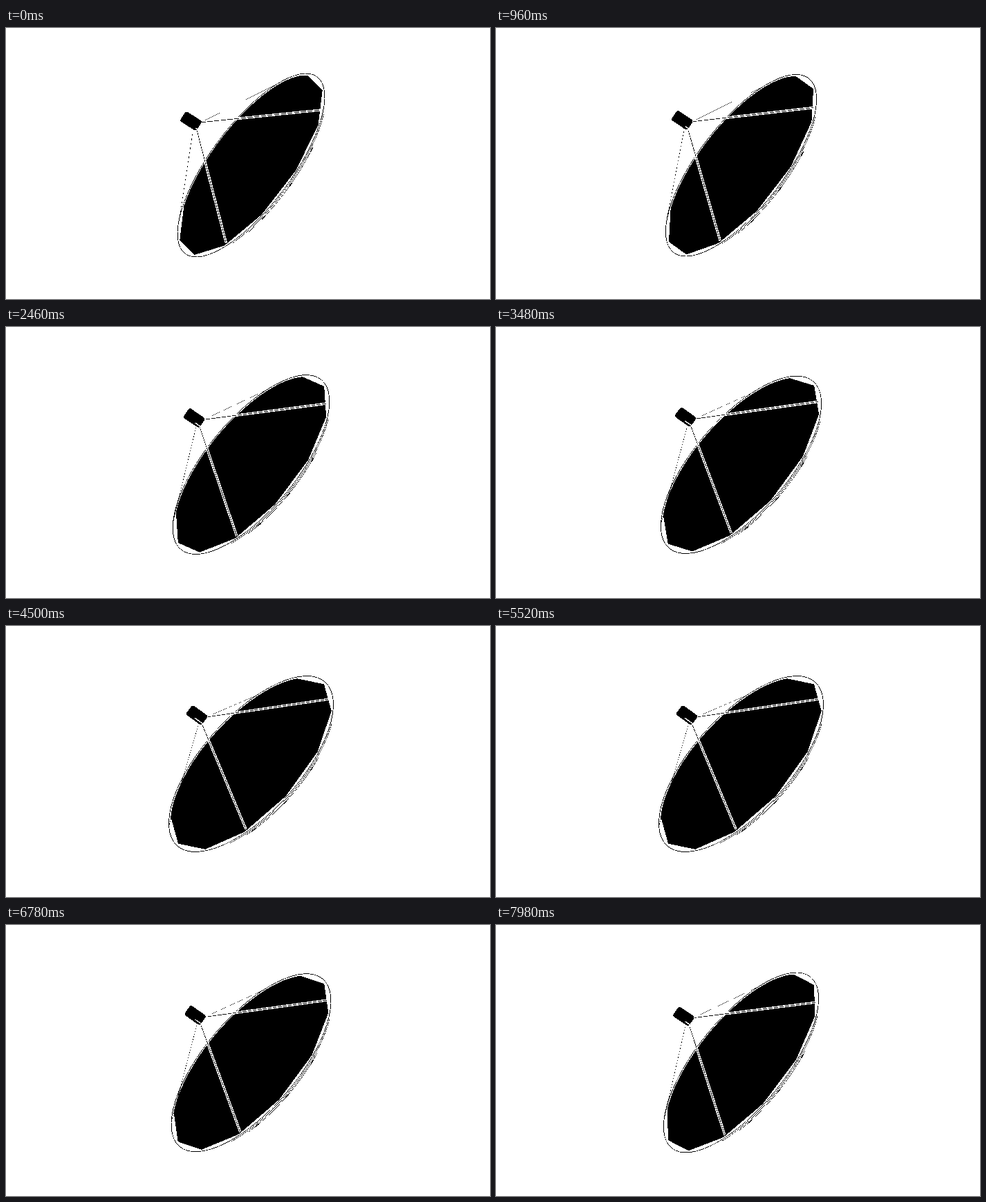
Recreate the animation shown at these times as an HTML page with a canvas. Size 700 by 393 pixels, loop 8000 ms.

```html
<!DOCTYPE html>
<html lang="en">
<head>
<meta charset="utf-8">
<title>Dish antenna</title>
<style>
  html, body { margin: 0; width: 100%; height: 100%; overflow: hidden; background: #fff; }
  canvas { display: block; }
</style>
</head>
<body>
<canvas id="stage" width="700" height="393"></canvas>
<script>
const W = 700, H = 393, LOOP = 8000, STEP = 60, TURN = 5.01, SWING = 4.5;
const DEG = Math.PI / 180, FACET = 30 * DEG, INNER = 0.98;
const ctx = document.getElementById('stage').getContext('2d', { willReadFrequently: true });

// Angle on the rim, reach from the dish centre, and foot on the feed.
const BACK_STRUTS = [
  { angle: 317, reach: 1, foot: [14, -8] },
  { angle: 221, reach: 1, foot: [10, 10] }
];
const FRONT_STRUTS = [
  { angle: 36, reach: 0.965, foot: [14, -7] },
  { angle: 137, reach: 0.96, foot: [15, 7] }
];

const mix = (a, b, k) => a + (b - a) * k;

// Rim ellipse from its half width, half height and the sideways offset of its top.
function rimAt(k) {
  const hx = mix(106.5, 119, k), hy = mix(133, 127.5, k), lean = mix(79.5, 80.5, k);
  const xx = hx * hx, yy = hy * hy, xy = -lean * hy;
  const mean = (xx + yy) / 2, spread = Math.hypot((xx - yy) / 2, xy);
  return {
    x: 354.5, y: mix(199, 200, k),
    a: Math.sqrt(mean + spread), b: Math.sqrt(mean - spread),
    tilt: Math.atan2(2 * xy, xx - yy) / 2,
    spin: -17.5 * DEG * k
  };
}

const feedAt = k => ({ x: mix(267.5, 276, k), y: mix(135, 129.3, k), tilt: mix(33, 36, k) * DEG });

function place({ x, y, tilt }, px, py) {
  const c = Math.cos(tilt), s = Math.sin(tilt);
  return [x + px * c - py * s, y + px * s + py * c];
}

const rimPoint = (rim, angle, reach) =>
  place(rim, rim.a * reach * Math.cos(angle), rim.b * reach * Math.sin(angle));

function arc(rim, scale = 1, shift = 0, from = 0, to = 2 * Math.PI) {
  ctx.ellipse(rim.x + shift, rim.y + shift * 0.8, rim.a * scale, rim.b * scale, rim.tilt, from, to);
}

function stroke(color, width) {
  ctx.strokeStyle = color;
  ctx.lineWidth = width;
  ctx.stroke();
}

function drawStrut(rim, feed, { angle, reach, foot }, halo) {
  ctx.beginPath();
  ctx.moveTo(...place(feed, ...foot));
  ctx.lineTo(...rimPoint(rim, angle * DEG + rim.spin, reach));
  if (halo) stroke('#fff', 3.4);
  stroke('#000', halo ? 0.8 : 0.6);
}

// The near edge is a smooth curve, the far edge a row of flat facets.
function drawBowl(rim) {
  const first = -12 * DEG + rim.spin, count = 8;
  ctx.beginPath();
  arc(rim, INNER, 0, first + count * FACET, first + 2 * Math.PI);
  for (let i = 1; i < count; i++) ctx.lineTo(...rimPoint(rim, first + i * FACET, INNER));
  ctx.fillStyle = '#000';
  ctx.fill();
}

function drawRim(rim) {
  ctx.beginPath();
  arc(rim);
  stroke('#000', 0.9);
  for (let i = 1; i <= 2; i++) {
    ctx.beginPath();
    arc(rim, 1, 1.5 * i, 0.3 + 0.4 * i, 2.5 - 0.2 * i);
    stroke('#000', 0.75);
  }
  for (let i = 0; i < 3; i++) {
    const at = 1.11 + 0.39 * i - rim.spin * 0.4;
    ctx.beginPath();
    arc(rim, 1, 3, at - 0.02, at + 0.02);
    stroke('#000', 1.5);
  }
}

function drawFeed(feed, k) {
  ctx.save();
  ctx.translate(feed.x, feed.y);
  ctx.rotate(feed.tilt);
  ctx.beginPath();
  ctx.roundRect(-14, -8.5, 28, 17, 3.5);
  ctx.fillStyle = '#000';
  ctx.fill();
  ctx.beginPath();
  ctx.moveTo(mix(11, 0, k), 5);
  ctx.lineTo(14, 5);
  stroke('#fff', 1.4);
  ctx.restore();
}

// Reduce the picture to pure black and white.
function harden() {
  const image = ctx.getImageData(0, 0, W, H), px = image.data;
  for (let i = 0; i < px.length; i += 4) {
    px[i] = px[i + 1] = px[i + 2] = px[i] < 128 ? 0 : 255;
  }
  ctx.putImageData(image, 0, 0);
}

function draw(ms) {
  const seconds = Math.floor(ms / STEP) * STEP / 1000;
  const k = (TURN - Math.abs(seconds - TURN)) / SWING;
  const rim = rimAt(k), feed = feedAt(k);
  ctx.fillStyle = '#fff';
  ctx.fillRect(0, 0, W, H);
  BACK_STRUTS.forEach(strut => drawStrut(rim, feed, strut, false));
  drawBowl(rim);
  drawRim(rim);
  FRONT_STRUTS.forEach(strut => drawStrut(rim, feed, strut, true));
  drawFeed(feed, k);
  harden();
}

const begin = performance.now();
function tick() {
  draw((performance.now() - begin) % LOOP);
  requestAnimationFrame(tick);
}
tick();
</script>
</body>
</html>
```
